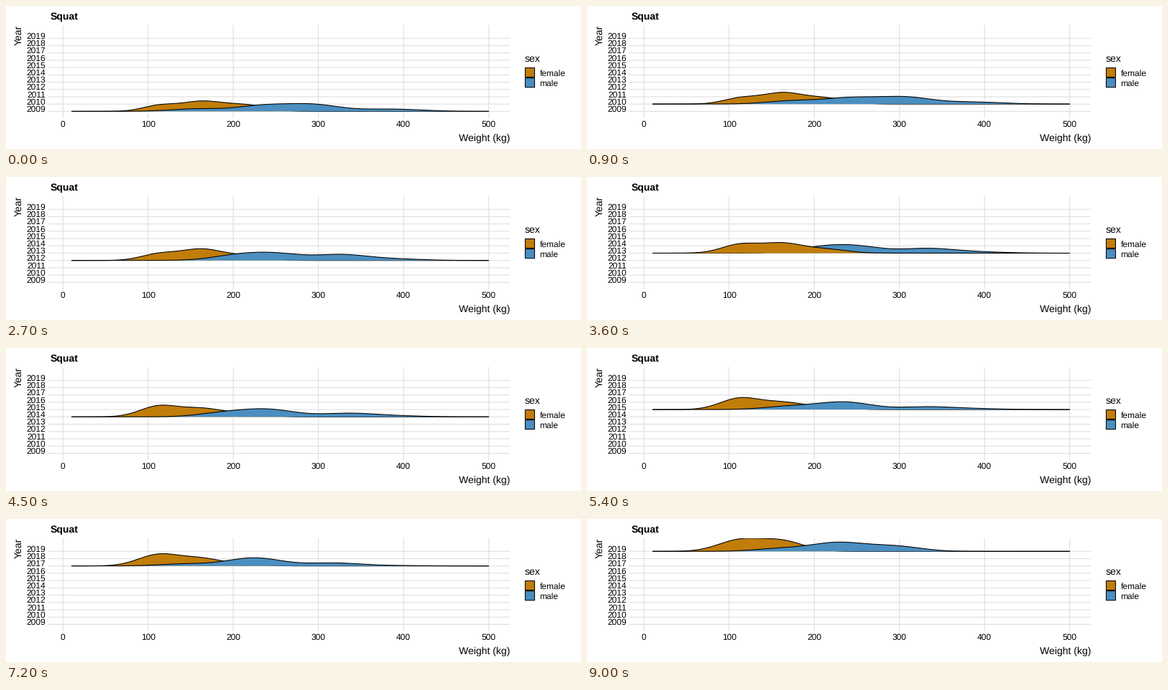
Write a matplotlib script that moves like this. It is 800 by 200 pixels and loops after 9.9 s.

```python
import numpy as np
import matplotlib.pyplot as plt
from matplotlib.animation import FuncAnimation
from matplotlib.patches import Polygon, Rectangle

plt.rcParams["font.family"] = "Liberation Sans"
plt.rcParams["text.hinting"] = "none"

PX = 0.72  # points per pixel at 100 dpi
LINE = 1.07 * PX
ORANGE, BLUE, GRID = "#c17d0a", "#4b8ebf", "#dedede"
YEARS = range(2009, 2020)
FEMALE_IN_FRONT = 2013
TOP, LEFT, RIGHT = 26.7, 62, 700.8
KG = np.linspace(10, 500, 512)


def x_px(kg):
    return 79.2 + 1.185 * kg


def y_px(year):
    return 147.35 - 10.21 * (year - YEARS[0])


def bump(centre, spread, height):
    return height * np.exp(-((KG - centre) / spread) ** 2 / 2)


def female_density(t):
    """Light lifters take over from the heavy tail as t goes from 0 to 10."""
    rise = 1 / (1 + np.exp(-2 * (t - 4)))
    return (bump(112, 19 + 0.6 * t, 7.5 + 8 * rise)
            + bump(162, 25, 12.7 + 3.5 * np.cos(0.65 * (t - 2)))
            + bump(215, 24, 0.85 * (10 - t)))


def male_density(t):
    """The main peak grows while the shoulders beside it sway and fade."""
    sway = np.sin(0.65 * (t - 1))
    return (bump(172 + 30 * sway, 29, 4.3 + 1.5 * sway)
            + bump(236 + 12 * np.sin(0.55 * t), 32, 8.2 + 0.4 * t)
            + bump(295 + 38 * np.sin(np.pi * t / 10), 30,
                   6.3 + 2.9 * np.cos(0.55 * (t - 1)))
            + bump(385, 35, 0.32 * (10 - t)))


fig = plt.figure(figsize=(8, 2), dpi=100, facecolor="white")
ax = fig.add_axes([0, 0, 1, 1])
ax.set(xlim=(0, 800), ylim=(200, 0))
ax.axis("off")
panel = Rectangle((0, TOP), 800, 200 - TOP, transform=ax.transData)


def label(x, y, text, size=12, **style):
    ax.text(x, y, text, fontsize=size * PX, va="baseline", **style)


def grid_line(xs, ys):
    ax.plot(xs, ys, color=GRID, lw=LINE, solid_capstyle="butt",
            snap=False, zorder=1)


for year in YEARS:
    grid_line([LEFT - 3.7, RIGHT], [y_px(year)] * 2)
    label(55.3, y_px(year) + 0.6, str(year), ha="right")
for kg in range(0, 501, 100):
    grid_line([x_px(kg)] * 2, [TOP, 157])
    label(x_px(kg), 169, str(kg), ha="center")

label(LEFT, 19, "Squat", 14, weight="bold")
label(RIGHT, 189, "Weight (kg)", 14, ha="right")
label(21.3, 27, "Year", 14, ha="right", rotation=90, rotation_mode="anchor")

label(721.8, 78, "sex", 14)
for name, color, mid in (("female", ORANGE, 93), ("male", BLUE, 107.2)):
    ax.add_patch(Rectangle((722.4, mid - 6.5), 13, 13, fc=color, ec="black",
                           lw=LINE, snap=False))
    label(742.6, mid + 4.6, name)


class Ridge:
    def __init__(self, color, density):
        self.density = density
        self.area = ax.add_patch(Polygon([(0, 0)] * 3, fc=color, ec="none"))
        self.line, = ax.plot([], [], color="black", lw=LINE, snap=False,
                             solid_capstyle="butt")
        for part in (self.area, self.line):
            part.set_clip_path(panel)

    def show(self, i, z):
        base = y_px(YEARS[i])
        xs, ys = x_px(KG), base - self.density(i)
        self.area.set_xy([(xs[0], base), *zip(xs, ys), (xs[-1], base)])
        self.line.set_data(xs, ys)
        self.area.set_zorder(z)
        self.line.set_zorder(z + 0.5)
        return self.area, self.line


female, male = Ridge(ORANGE, female_density), Ridge(BLUE, male_density)


def update(i):
    front = 6 if YEARS[i] == FEMALE_IN_FRONT else 4
    return female.show(i, front) + male.show(i, 5)


anim = FuncAnimation(fig, update, frames=len(YEARS), interval=900,
                     repeat=True, repeat_delay=0)
plt.show()
```
